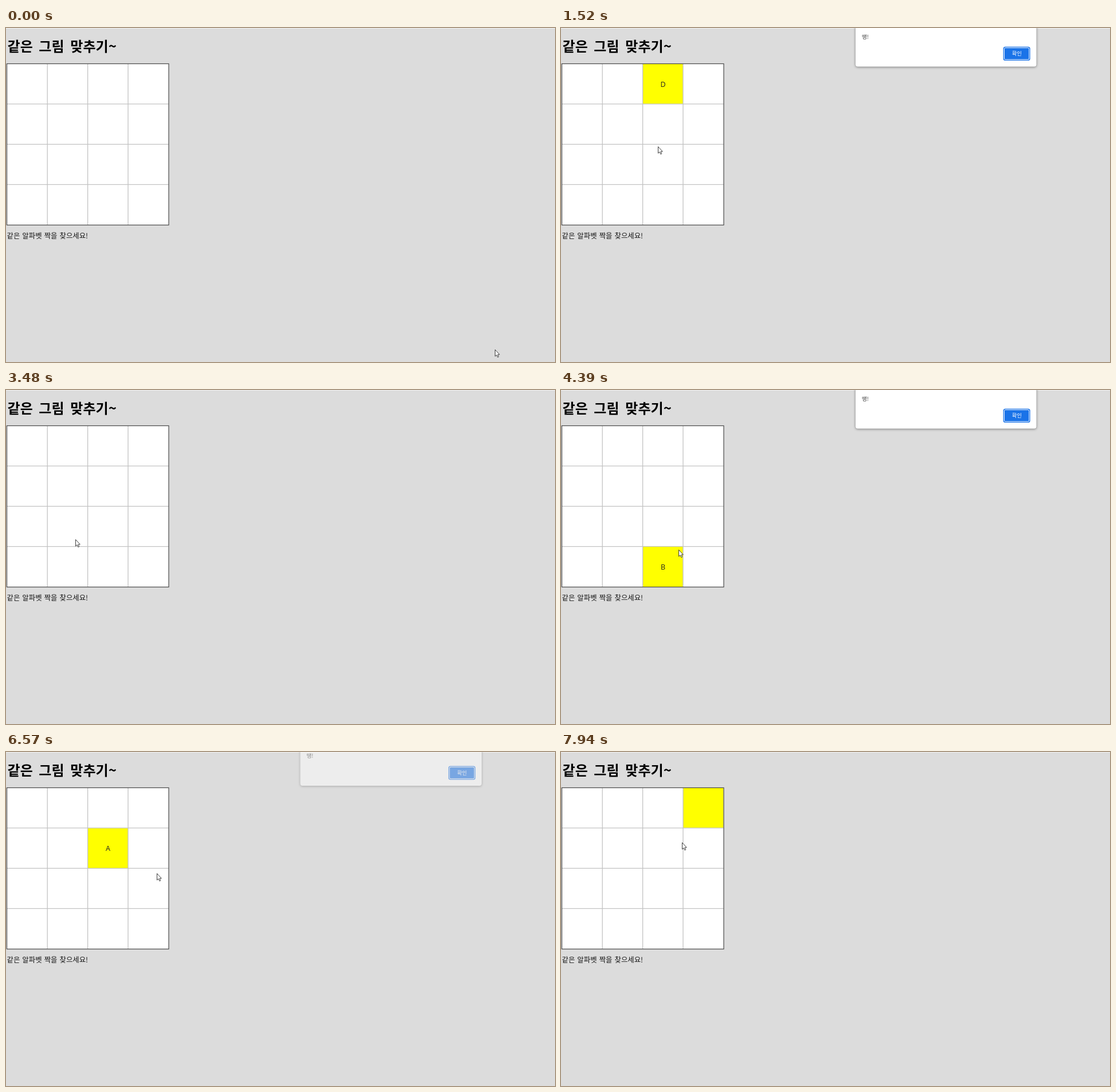
An HTML page for the animation above (8 s loop, 958x584 px).

```html
<!DOCTYPE html>
<html lang="ko">
<head>
<meta charset="utf-8">
<title>같은 그림 맞추기</title>
<style>
  html, body { margin: 0; width: 100%; height: 100%; overflow: hidden; background: #dcdcdc; }
  svg { display: block; font-family: "Noto Sans CJK KR", "Noto Sans CJK", sans-serif; }
  .title { font-size: 24px; font-weight: bold; letter-spacing: .15px; word-spacing: 3.5px; }
  .hint { font-size: 12.4px; word-spacing: .6px; fill: #151515; }
  .letter { font: 12.5px "Open Sans", "Noto Sans", sans-serif; fill: #222; text-anchor: middle; }
  .panel { fill: #fff; filter: drop-shadow(0 1px 2px rgba(0, 0, 0, .45)); }
  .message { font-size: 9.5px; fill: #444; }
  .ok { font-size: 9.3px; font-weight: 500; fill: #fff; text-anchor: middle; }
</style>
</head>
<body>
<svg width="958" height="584">
  <rect width="958" height="1" fill="#f3f3f3"/>
  <text class="title" x="2.5" y="40.5">같은 그림 맞추기~</text>
  <rect x="1.5" y="62.5" width="282.5" height="282" fill="#fff"/>
  <g id="card">
    <rect width="70.4" height="70.4" fill="#ff0"/>
    <text id="letter" class="letter" x="35.4" y="40.3"></text>
  </g>
  <path id="lines" stroke="#c3c3c3" stroke-width="1.3"/>
  <rect x="1.5" y="62.5" width="282.5" height="282" fill="none" stroke="#484848" stroke-width="1.2"/>
  <text class="hint" x="1.5" y="368">같은 알파벳 짝을 찾으세요!</text>
  <g id="dialog">
    <rect class="panel" x="514" y="-30" width="315.5" height="97.5" rx="4"/>
    <text class="message" x="525" y="18.6">땡!</text>
    <rect x="773" y="33.7" width="45" height="22.6" rx="3" fill="#1a73e8"/>
    <g id="focus" fill="#1a73e8">
      <rect x="771.7" y="32.8" width="47" height="24.2" rx="3.5"/>
      <rect x="773.5" y="34.6" width="43.4" height="20.6" rx="2" stroke="#fff"/>
    </g>
    <text class="ok" x="795.5" y="47.9">확인</text>
  </g>
  <path id="pointer" d="M0 0V11.5L2.6 9.2L4.4 13.2L6.2 12.4L4.5 8.5H7.8Z"
        fill="#fff" stroke="#2a2a2a" stroke-width=".9"/>
</svg>
<script>
const LOOP = 8000, FADE = 140, CELL = 70.4, LEFT = 1.8, TOP = 62.5;
const START = [30, 853, 562], RIM = [734, 66], BUTTON = [794, 41];

// Each round turns a card, tries a second spot, then dismisses the alert.
// approach and drift are points [time, x, y] the pointer passes on its way.
const rounds = [
  { letter: 'D', col: 2, row: 0, pick: 940, second: 1260, spot: [121, 191], dismiss: 3150,
    approach: [120, 303, 256], drift: [1520, 169, 207] },
  { letter: 'B', col: 2, row: 3, pick: 3980, second: 4130, spot: [168, 237], dismiss: 5475,
    approach: [3480, 121, 261], drift: [4390, 205, 279] },
  { letter: 'A', col: 2, row: 1, pick: 6120, second: 6380, spot: [254, 181], dismiss: 7400,
    approach: [5500, 655, 92], drift: [6570, 263, 212] },
  { letter: 'C', col: 3, row: 0, pick: 7810, second: 7940, spot: [211, 158], dismiss: 9400,
    approach: [7500, 520, 70], drift: [8000, 211, 158] }
];

const $ = id => document.getElementById(id);
const clamp = v => Math.max(0, Math.min(1, v));
const ease = p => p * p * (3 - 2 * p);

function roundPath({ col, row, pick, second, spot, dismiss, approach, drift }) {
  const [, ax, ay] = approach;
  const card = [LEFT + (col + 0.5) * CELL - 8, TOP + (row + 0.5) * CELL + 4];
  const leave = dismiss - 100;
  return [
    approach, [Math.max(approach[0], pick - 550), ax, ay],
    [pick - 130, ...card], [pick + 50, ...card],
    [second, ...spot], [second + 60, ...spot], drift,
    [second + 580, ...RIM], [second + 850, ...RIM],
    [Math.min(second + 1330, leave), ...BUTTON], [leave, ...BUTTON]
  ];
}

const path = [START, ...rounds.flatMap(roundPath)];

function pointerAt(t) {
  const next = path.findIndex(key => key[0] > t);
  if (next === 0) return START.slice(1);
  const [t0, x0, y0] = path[next - 1], [t1, x1, y1] = path[next];
  const p = ease((t - t0) / (t1 - t0));
  return [x0 + (x1 - x0) * p, y0 + (y1 - y0) * p];
}

function show(id, visible) {
  $(id).style.display = visible ? '' : 'none';
}

function drawCard(t) {
  const r = rounds.find(r => t >= r.pick && t < r.dismiss);
  show('card', r);
  if (!r) return;
  $('card').setAttribute('transform', `translate(${LEFT + r.col * CELL} ${TOP + r.row * CELL})`);
  $('letter').textContent = t >= r.pick + 180 ? r.letter : '';
}

function drawDialog(t) {
  const r = rounds.find(r => t >= r.second + 120 && t < r.dismiss + FADE);
  show('dialog', r);
  if (!r) return;
  const p = clamp(Math.min(t - r.second - 120, r.dismiss + FADE - t) / FADE);
  $('dialog').setAttribute('opacity', clamp(1.4 * p - 0.2));
  $('dialog').setAttribute('transform',
    `translate(671.5 ${-17 * (1 - p)}) scale(${1 + 0.006 * (1 - p)} 1) translate(-671.5 0)`);
  show('focus', t < r.dismiss - 70);
}

function frame() {
  const t = performance.now() % LOOP;
  drawCard(t);
  drawDialog(t);
  const [x, y] = pointerAt(t).map(v => Math.round(v) + 0.5);
  $('pointer').setAttribute('transform', `translate(${x} ${y})`);
  requestAnimationFrame(frame);
}

$('lines').setAttribute('d', [1, 2, 3].map(i =>
  `M${LEFT + i * CELL} ${TOP}v282M${LEFT} ${TOP + i * CELL}h282`).join(''));
frame();
</script>
</body>
</html>
```
